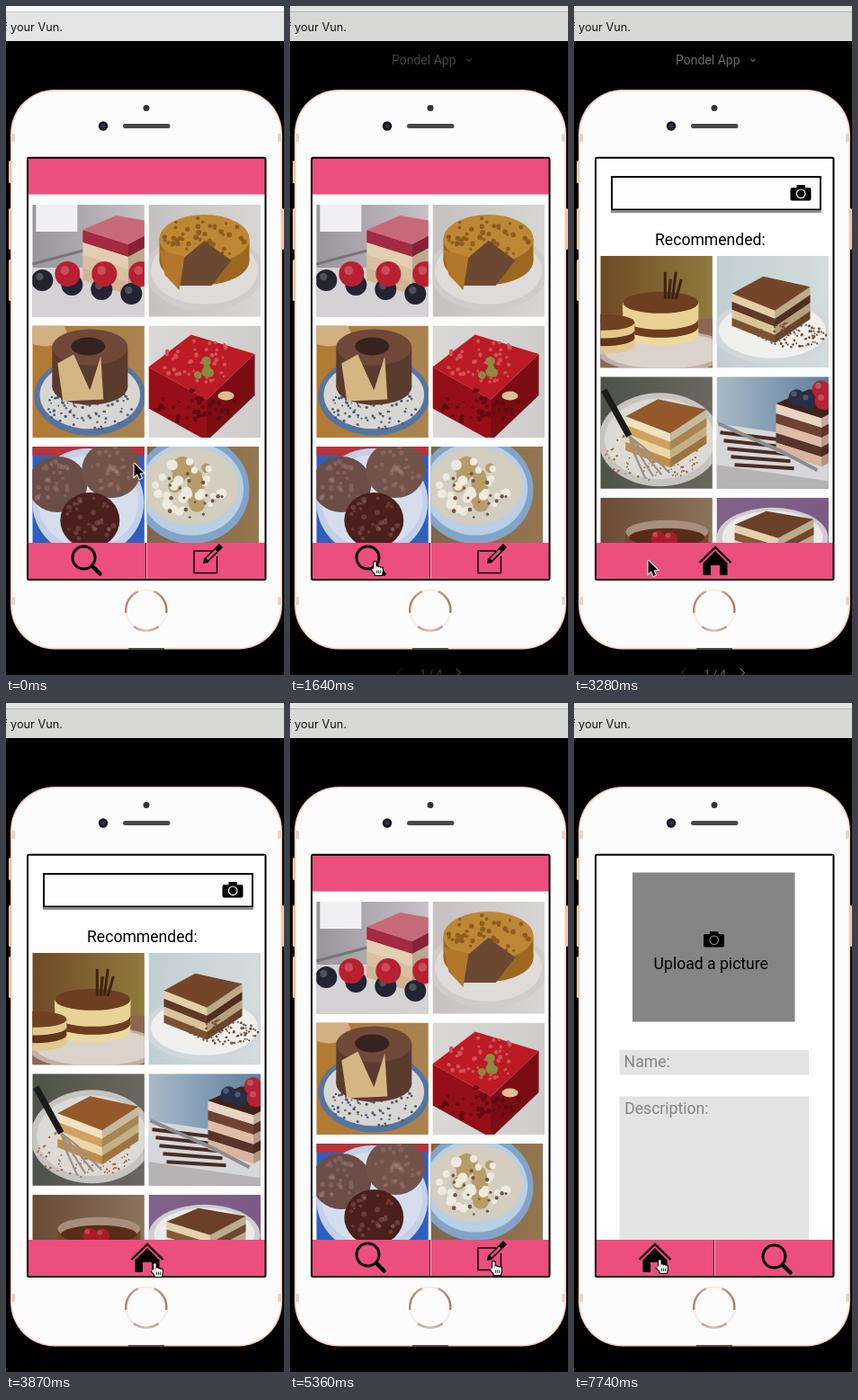
Recreate the animation shown at these times as an HTML page with a canvas. Size 309 px wide and 744 px high, loop 8 s.

```html
<!DOCTYPE html>
<html lang="en">
<head>
<meta charset="utf-8">
<title>Phone prototype</title>
<style>
html, body { margin: 0; width: 100%; height: 100%; overflow: hidden; background: #000; }
canvas { display: block; width: 309px; height: 744px; }
</style>
</head>
<body>
<canvas id="stage" width="309" height="744"></canvas>
<script>
const W = 309, H = 744, LOOP = 8000, TICK = 148.9;
const PINK = '#ec4f7e';
const stage = document.getElementById('stage').getContext('2d');
let g = stage;

// ---- drawing helpers ----
function rect(c, x, y, w, h) { g.fillStyle = c; g.fillRect(x, y, w, h); }

function round(c, x, y, w, h, r) {
  g.fillStyle = c;
  g.beginPath();
  g.roundRect(x, y, w, h, r);
  g.fill();
}

function blob(c, x, y, rx, ry = rx) {
  g.fillStyle = c;
  g.beginPath();
  g.ellipse(x, y, rx, ry, 0, 0, 7);
  g.fill();
}

function trace(p) {
  g.beginPath();
  for (let i = 0; i < p.length; i += 2) g.lineTo(p[i], p[i + 1]);
}

function poly(c, ...p) { trace(p); g.fillStyle = c; g.fill(); }

function line(c, w, ...p) { trace(p); g.strokeStyle = c; g.lineWidth = w; g.stroke(); }

function arc(c, w, x, y, r, from = 0, to = 7) {
  g.strokeStyle = c;
  g.lineWidth = w;
  g.beginPath();
  g.arc(x, y, r, from, to);
  g.stroke();
}

function text(s, x, y, size, c, family = 'Roboto') {
  g.font = `${size}px ${family}, sans-serif`;
  g.fillStyle = c;
  g.fillText(s, x, y);
}

function fade(x, y, ...colors) {
  const f = g.createLinearGradient(x, 0, x + y, 0);
  colors.forEach((c, i) => f.addColorStop(i / (colors.length - 1), c));
  return f;
}

// ---- photo parts, in a 124 px square ----
function backdrop(left, right, low) {
  rect(fade(0, 124, left, right), 0, 0, 125, 125);
  if (low) rect(low, 0, 70, 125, 55);
}

function plate(rim, c, x, y, rx, ry) {
  blob(rim, x, y, rx, ry);
  blob(c, x, y - 1, rx * .9, ry * .86);
}

function specks(c, n, x, y, rx, ry, size) {
  let seed = n * 7919 + x;
  const rnd = () => (seed = (seed * 16807) % 2147483647) / 2147483647;
  for (let i = 0; i < n; i++) {
    const a = rnd() * 6.283, d = Math.sqrt(rnd());
    blob(c, x + Math.cos(a) * d * rx, y + Math.sin(a) * d * ry, size * (.5 + rnd() * .5));
  }
}

// Square piece seen from a corner, sides in layers from top to bottom.
function slab(x, y, w, d, h, top, ...layers) {
  const fx = x + w * .55, fy = y + d, rx = x + w, ry = y - d * .4;
  layers.forEach((c, i) => {
    const a = h * i / layers.length, b = a + h / layers.length;
    poly(c, x, y + a, fx, fy + a, rx, ry + a, rx, ry + b, fx, fy + b, x, y + b);
  });
  poly('rgba(0,0,0,.18)', fx, fy, rx, ry, rx, ry + h, fx, fy + h);
  poly(top, x, y, x + w * .4, y - d, rx, ry, fx, fy);
}

// Round piece, layers as in slab.
function drum(x, y, rx, ry, h, top, ...layers) {
  for (let i = layers.length; i > 0; i--) {
    const low = h * i / layers.length;
    rect(layers[i - 1], x - rx, y, rx * 2, low);
    blob(layers[i - 1], x, y + low, rx, ry);
  }
  blob(top, x, y, rx, ry);
}

function berries(c, n, x, y, dx, dy, r) {
  for (let i = 0; i < n; i++) {
    blob(c, x + i * dx, y + i * dy, r);
    blob('rgba(255,255,255,.2)', x + i * dx - 3, y + i * dy - 4, r * .35);
  }
}

// ---- photos ----
function cheesecake() {
  backdrop('#99959a', '#c5c1c6', '#d5d2d6');
  rect('#f0f0f2', 4, 0, 46, 30);
  line('#77757a', 3, 0, 66, 60, 50);
  slab(56, 28, 92, 16, 56, '#c66a7a', '#a32a40', '#e2ceb3', '#d8c0a0', '#cfb592');
  berries('#23242f', 4, 11, 84, 33, 5, 12);
  berries('#b82032', 3, 39, 77, 41, 0, 14);
}

function mooncake() {
  backdrop('#c4c1c0', '#d8d6d5');
  plate('#cfcccb', '#dedbd9', 62, 74, 66, 44);
  drum(62, 38, 50, 27, 24, '#bd8835', '#9c671f');
  specks('#8f5c1d', 45, 62, 36, 46, 23, 3);
  poly('#6b4832', 38, 60, 62, 40, 92, 62, 70, 90, 34, 90);
  poly('#b2772b', 12, 50, 40, 58, 34, 95, 18, 78);
}

function ringCake() {
  backdrop('#b27a30', '#a98352');
  blob('#d3b083', 14, 8, 24, 15);
  plate('#5475a0', '#d8d6d2', 64, 78, 62, 44);
  specks('#4d5d78', 90, 64, 90, 48, 26, 1.8);
  drum(64, 24, 42, 20, 44, '#6f4838', '#5c3b2f');
  blob('#37221d', 62, 23, 19, 10);
  poly('#d5b683', 28, 42, 46, 32, 64, 72, 76, 34, 79, 82, 34, 84);
}

function redSweet() {
  backdrop('#d9d8d6', '#cfcdcb');
  slab(0, 46, 118, 36, 46, '#bb1b24', '#960f18');
  specks('#d65058', 45, 58, 40, 45, 24, 2.5);
  specks('#600a10', 40, 50, 90, 48, 18, 3);
  specks('#8a8a42', 6, 60, 48, 10, 10, 6);
  blob('#dcbf93', 86, 78, 9, 5);
}

function patties() {
  backdrop('#2f5fbd', '#2f5fbd');
  rect('#b8343a', 0, 0, 125, 10);
  plate('#c3d0e8', '#d6deee', 62, 62, 62, 60);
  for (const [x, y, c] of [[28, 42, '#6b4d46'], [88, 26, '#725349'], [64, 82, '#4a1f1c']]) {
    blob(c, x, y, 33, 31);
    specks('rgba(190,150,140,.25)', 30, x, y, 28, 26, 3);
  }
}

function pudding() {
  backdrop('#7e664b', '#94764f');
  plate('#82a4c8', '#b8cfe4', 50, 48, 64, 60);
  blob('#d3cebf', 49, 44, 53, 43);
  specks('#b79c68', 12, 46, 42, 32, 24, 10);
  specks('#eeeadf', 26, 48, 46, 42, 32, 6);
  specks('#735742', 18, 50, 54, 40, 28, 2.6);
}

function roundTiramisu() {
  backdrop('#6f4a24', '#8f7a3e', '#8d6652');
  plate('#bfaea9', '#dcd2cc', 70, 106, 74, 24);
  drum(67, 52, 42, 12, 36, '#6c3f20', '#e8d294', '#e8d294', '#6d3d1d', '#ecd9a0');
  for (let i = 0; i < 4; i++) line('#3f2210', 3, 72 + i * 4, 48, 72 + i * 6, 18 + i % 2 * 8);
  drum(4, 74, 34, 9, 26, '#6f4120', '#e2c88c', '#5f3619', '#e2c88c');
}

function squareTiramisu() {
  backdrop('#c2cfd1', '#d4dcdd');
  plate('#d2d8da', '#f0f0ef', 62, 84, 66, 36);
  slab(17, 42, 87, 19, 36, '#744629', '#e6cfa6', '#5f3b25', '#dcc39a', '#7a5233');
  specks('#774f35', 90, 84, 88, 38, 14, 1.5);
}

function forkTiramisu() {
  backdrop('#4d5348', '#6b675f');
  plate('#c5c4c0', '#dcdad6', 66, 70, 68, 52);
  specks('#a06b40', 130, 58, 88, 54, 28, 1.4);
  slab(28, 44, 90, 19, 38, '#94582b', '#f0e2c0', '#d0a261', '#ecd6a4', '#c08e4c');
  line('#1c1a18', 7, 4, 15, 32, 66);
  for (let i = 0; i < 4; i++) line('#9c9184', 2.2, 32, 66, 38 + i * 4, 86 - i * 2, 50 + i * 9, 113 - i * 2);
}

function berryCake() {
  backdrop('#a9bac6', '#5d7f9e', '#b5b3b3');
  poly('#d6d7da', 0, 52, 124, 70, 124, 116, 0, 98);
  for (let i = 0; i < 5; i++) line('#4b2c24', 4, 4 + i * 4, 62 + i * 9, 70 + i * 4, 70 + i * 8);
  slab(66, 30, 92, 16, 54, '#402219', '#ead3c2', '#704232', '#e0bca8', '#59342a', '#d9b49e');
  line('#8e8b8c', 4, 2, 52, 70, 82, 112, 104);
  berries('#272e48', 2, 89, 23, 13, 4, 9);
  berries('#b32335', 2, 116, 14, 3, 13, 10);
}

function glassDessert() {
  backdrop('#6b4a34', '#8a735c');
  drum(74, 38, 46, 13, 40, '#a88f7c', '#74462b');
  blob('#582c18', 74, 44, 42, 10);
  berries('#a81d27', 2, 64, 45, 14, 1, 8);
}

function plumTiramisu() {
  backdrop('#80628a', '#7c5c85');
  plate('#d2ccd2', '#eceaea', 62, 45, 62, 34);
  slab(20, 30, 88, 15, 26, '#6b4028', '#e4d0ae', '#875736', '#e4d0ae');
}

function photo(paint, x, y) {
  g.save();
  g.beginPath();
  g.rect(x, y, 124.5, Math.min(124.5, 597 - y));
  g.clip();
  g.translate(x, y);
  paint();
  g.restore();
}

// ---- icons ----
function lens(x, y) {
  arc('#000', 3, x, y, 12.5);
  g.lineCap = 'round';
  line('#000', 4.5, x + 10, y + 10, x + 18, y + 18);
  g.lineCap = 'butt';
}

function house(x) {
  line('#000', 2.4, x - 17.5, 619, x, 602, x + 17.5, 619);
  poly('#000', x, 606, x + 13.5, 619.5, x + 13.5, 633, x - 13.5, 633, x - 13.5, 619.5);
  rect(PINK, x - 5, 622, 10, 11);
}

function pencil() {
  line('#000', 1.4, 229, 606, 209, 606, 209, 630.5, 234.5, 630.5, 234.5, 612);
  line('#000', 6, 222, 617, 239, 600);
  line(PINK, 2.5, 223.5, 615.5, 233.5, 605.5);
  poly('#000', 219, 620, 220, 614, 225, 619);
}

function camera(x, y, back) {
  round('#000', x, y + 3, 23, 14.5, 2);
  rect('#000', x + 7, y, 9.5, 5);
  arc(back, 1.2, x + 11.7, y + 9.8, 4.8);
}

// ---- phone and pages ----
function phone() {
  const metal = '#eec5ae';
  [[172, 25], [225, 46], [282, 46]].forEach(([y, h]) => round(metal, 3, y, 4, h, 1.5));
  round(metal, 306, 225, 3, 46, 1.5);
  ['#edc4ad', '#f9e6dc', '#fcfcfc'].forEach((c, i) =>
    round(c, 5 + i, 93 + i, 302 - i * 2, 622.5 - i * 2, 49 - i));
  for (const y of [142, 657]) for (const x of [5, 302]) rect('#ecd3c6', x, y, 5, 9);
  rect('#4a4340', 136, 714, 40, 2);
  blob('#333', 156, 113.5, 3.5);
  blob('#17171d', 108, 133.5, 5.2);
  blob('#2c3550', 108, 133.5, 2.4);
  round('#48484a', 130, 131, 52.5, 5, 2.5);

  const sheen = fade(133, 45, '#b0826e', '#dcc0b2', '#a87c68');
  arc('#f5ece7', 2, 155.8, 672, 22.6);
  for (let i = 0; i < 3; i++) {
    const mid = Math.PI * (.5 + i * 2 / 3);
    arc(sheen, 2.4, 155.8, 672, 22.6, mid - .65, mid + .65);
  }
}

function footer(split) {
  rect(PINK, 24, 597, 264, 41);
  if (split) {
    rect('#4a1827', 155, 597, 1, 41);
    rect('#f7b4c8', 156, 597, 1, 41);
  }
}

function grid(top, photos) {
  photos.forEach((p, i) => photo(p, i % 2 ? 158.5 : 29.3, top + (i >> 1) * 134.5));
}

function homePage() {
  rect(PINK, 24, 169, 264, 40.5);
  grid(221, [cheesecake, mooncake, ringCake, redSweet, patties]);
  photo(pudding, 156.5, 490);
  footer(true);
  lens(86.5, 613.5);
  pencil();
}

function searchPage() {
  rect('#8c8c8c', 41, 227, 234, 3);
  rect('#000', 41, 189, 234, 38);
  rect('#fdfdfd', 43, 191, 230, 34.5);
  camera(240.5, 199, '#fff');
  text('Recommended:', 90, 266, 17.6, '#000');
  grid(277.8, [roundTiramisu, squareTiramisu, forkTiramisu, berryCake, glassDessert, plumTiramisu]);
  footer(false);
  house(157);
}

function uploadPage() {
  rect('#858585', 65, 188.5, 180.5, 166);
  camera(144, 254, '#858585');
  text('Upload a picture', 88.6, 296, 17.6, '#000');
  rect('#e3e3e3', 50.5, 385.7, 210.5, 27.8);
  text('Name:', 55.6, 405, 17.6, '#858585');
  rect('#e3e3e3', 50.5, 437.5, 210.5, 159.5);
  text('Description:', 56.2, 456.5, 17.6, '#858585');
  footer(true);
  house(90);
  lens(222.5, 615.5);
}

function render(page) {
  const c = document.createElement('canvas');
  c.width = W;
  c.height = H;
  g = c.getContext('2d');
  rect('#000', 0, 0, W, H);
  phone();
  rect('#fefefe', 24, 169, 264, 469);
  page();
  g.strokeStyle = '#000';
  g.lineWidth = 2;
  g.beginPath();
  g.roundRect(24, 168.7, 264.5, 469.3, 1.5);
  g.stroke();
  g = stage;
  return c;
}

const home = render(homePage);
const pages = [home, render(searchPage), home, render(uploadPage)];

// ---- overlays ----
function banner(dim) {
  rect(dim ? '#e2e2e0' : '#f8f8f8', 0, 0, W, 6);
  rect(dim ? '#b8b8b7' : '#cbcbcb', 0, 6, W, 1);
  rect(dim ? '#d8d8d6' : '#e4e4e4', 0, 7, W, 32);
  text('f your Vun.', -3.2, 28, 12.7, '#161616', 'Inter');
}

function chevron(x, y, dx, dy) {
  line('#fff', 1.1, x - dx - dy, y - dy - dx, x, y, x - dx + dy, y - dy + dx);
}

function viewerBar(alpha) {
  g.globalAlpha = alpha;
  text('Pondel App', 113, 65, 14, '#fff');
  text('1 / 4', 144.5, 746.5, 12, '#fff');
  chevron(198.7, 61.5, 0, 2.7);
  chevron(189.5, 741.5, 5, 0);
  g.globalAlpha = alpha * .35;
  chevron(119.5, 741.5, -5, 0);
  g.globalAlpha = 1;
}

function arrow() {
  const p = [.5, .5, .5, 15.5, 3.9, 12.4, 6.3, 18, 8.9, 16.9, 6.5, 11.5, 11.2, 11.2, .5, .5];
  line('#fff', 2, ...p);
  poly('#000', ...p);
}

function hand() {
  for (const [c, pad] of [['#000', 1], ['#fff', 0]]) {
    line(c, 2.6 + pad * 2, 1.6 - pad * .5, 9, 5.5, 13.5);
    for (let i = 0; i < 4; i++) {
      const y = i ? 5.5 + i * .7 : 1.2;
      round(c, 3.2 + i * 2.4 - pad, y - pad, 2.4 + pad * 2, 13 - y + pad * 2, 1.2);
    }
    round(c, 4.4 - pad, 9 - pad, 8 + pad * 2, 7 + pad * 2, 1.5);
  }
  for (let x = 6.6; x < 11; x += 1.9) line('#000', .8, x, 10.5, x, 14);
}

// ---- timeline, in ticks ----
// Hover begins, then the press turns to the next page.
const presses = [[6, 22], [26, 32], [36, 42], [52, 99]];
// Pointer glides: from, to, x, y.
const glides = [
  [0, 1, 125, 606], [2.8, 6, 90, 617], [16, 17, 82, 616], [24.4, 26, 161, 622],
  [34.5, 36, 222, 620], [41, 42, 225, 618], [47, 52, 91, 618]
];
const clamp = v => Math.max(0, Math.min(1, v));
const easeOut = u => 1 - (1 - u) ** 3;

function pointerAt(k) {
  let x = 142, y = 508;
  for (const [from, to, tx, ty] of glides) {
    const u = easeOut(clamp((k - from) / (to - from)));
    x += (tx - x) * u;
    y += (ty - y) * u;
  }
  return [Math.round(x), Math.round(y)];
}

function draw(t) {
  const k = Math.floor((t + 8) / TICK);
  g.drawImage(pages[presses.filter(p => k >= p[1]).length], 0, 0);
  banner(k >= 11);
  viewerBar(clamp(Math.min((k - 10.3) / 2.7, (23 - k) / 2.4)));
  g.save();
  g.translate(...pointerAt(k));
  presses.some(([from, to]) => k >= from && k < to) ? hand() : arrow();
  g.restore();
}

const start = performance.now();
function tick() {
  draw((performance.now() - start) % LOOP);
  requestAnimationFrame(tick);
}
tick();
</script>
</body>
</html>
```
